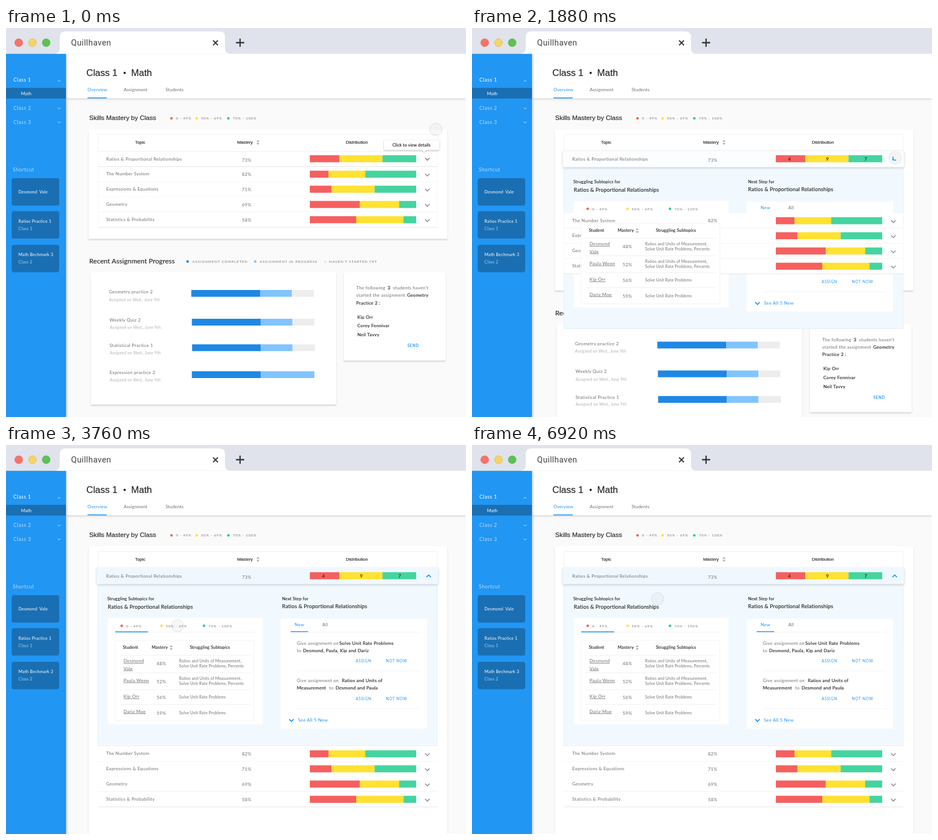
Recreate the animation shown at these times as an HTML page. Size 813 by 689 pixels, loop 6960 ms.

```html
<!DOCTYPE html>
<html lang="en">
<head>
<meta charset="utf-8">
<title>Class dashboard</title>
<style>
html, body { margin: 0; width: 100%; height: 100%; overflow: hidden; background: #fafafa; }
svg { display: block; }
text { font-family: Lato, sans-serif; white-space: pre; fill: #6e6e6e; font-size: 8px; letter-spacing: .3px; }
.dark, .sub { fill: #222; stroke: #222; stroke-width: .15px; }
.blue { fill: #2196f3; }
.sans { font-family: "Liberation Sans", Arial, sans-serif; fill: #1c1c1c; stroke: #1c1c1c; stroke-width: .12px; letter-spacing: 0; }
.nav { font-size: 9px; letter-spacing: .5px; fill: #b9dcfb; }
.mini { font-size: 7.5px; letter-spacing: .2px; }
.tab { letter-spacing: .1px; }
.note { font-size: 7px; letter-spacing: .2px; }
.pale { fill: #b0b0b0; }
.key { font-size: 6px; letter-spacing: 1px; }
.caps { letter-spacing: 1.1px; }
.act { font-size: 6.6px; letter-spacing: .75px; fill: #2196f3; }
.sub { font-size: 9.3px; letter-spacing: .2px; }
.link { text-decoration: underline; }
.white { fill: #fff; }
.lift { filter: drop-shadow(0 2px 1.2px rgba(0,0,0,.15)); }
</style>
</head>
<body>
<svg id="stage" width="813" height="689" viewBox="0 0 813 689"></svg>
<script>
const RED = '#f5605f', YELLOW = '#ffe232', GREEN = '#45d4a0';
const NAVY = '#1a6fb3', BLUE = '#2196f3', DEEP = '#1e88e5', SKY = '#82c4ff', GREY = '#ededed';
const LOOP = 6960, STEP = 40;

const esc = s => s.replace(/&/g, '&amp;');
const text = (x, y, s, cls = '', attrs = '') => `<text x="${x}" y="${y}" class="${cls}" ${attrs}>${esc(s)}</text>`;
const rect = (x, y, w, h, fill, attrs = '') => `<rect x="${x}" y="${y}" width="${w}" height="${h}" fill="${fill}" ${attrs}/>`;
const dot = (x, y, r, fill, attrs = '') => `<circle cx="${x}" cy="${y}" r="${r}" fill="${fill}" ${attrs}/>`;
const path = (d, stroke, w = 1, attrs = '') => `<path d="${d}" fill="none" stroke="${stroke}" stroke-width="${w}" ${attrs}/>`;
const line = (x1, x2, y, stroke = '#e6e6e6') => path(`M${x1} ${y}H${x2}`, stroke);
const group = (id, body, attrs = '') => `<g id="${id}" ${attrs}>${body}</g>`;
const chevron = (x, y, stroke, w = 1.6, r = 4) => path(`M${x - r} ${y - r / 2}l${r} ${r}l${r} ${-r}`, stroke, w);
const sorter = (x, y) => `<path d="M${x - 2.7} ${y - 1}l2.7 -3.6l2.7 3.6zM${x - 2.7} ${y + 1}l2.7 3.6l2.7 -3.6z" fill="#adadad"/>`;

// Stacked bar: edges are the x positions between segments
const bar = (edges, y, h, fills) =>
  fills.map((f, i) => rect(edges[i], y, edges[i + 1] - edges[i], h, f)).join('');

const legend = (y, dots, labels) => ['0 - 49%', '50% - 69%', '70% - 100%'].map((s, i) =>
  dot(dots[i], y, 2.3, [RED, YELLOW, '#2fc6a4'][i]) + text(labels[i], y + 2.4, s, 'key')).join('');

function browser() {
  const lights = [[22.5, '#fb7068', '#d9655f'], [46.8, '#f6d463', '#d3b85c'], [71, '#5cc254', '#55a84f']];
  return rect(0, 0, 813, 45.5, '#e0e3eb') +
    `<path d="M85 45.5q10 0 10 -10V16q0 -10 10 -10H377q10 0 10 10V35.5q0 10 10 10z" fill="#fff"/>` +
    lights.map(([x, f, s]) => dot(x, 26, 7, f, `stroke="${s}" stroke-width=".7"`)).join('') +
    text(115, 31, 'Quillhaven', '', 'style="font:14.5px Roboto,sans-serif;letter-spacing:.4px;fill:#444"') +
    path('M366 22l8.5 8.5m0 -8.5l-8.5 8.5', '#333', 1.9) +
    path('M406.5 26h14.5M413.7 18.8v14.5', '#333', 2.3);
}

function sidebar() {
  const card = (y, h) => rect(10, y, 84, h, NAVY, 'rx="4"');
  return rect(0, 45.5, 106, 644, BLUE, 'style="filter:drop-shadow(1px 0 2px #0004)"') +
    rect(0, 106, 106, 19, NAVY) +
    text(13, 95, 'Class 1', 'nav white') + text(26.5, 118.7, 'Math', 'white', 'style="letter-spacing:0"') +
    text(13, 145, 'Class 2', 'nav') + text(13, 169.5, 'Class 3', 'nav') + text(12, 254.2, 'Shortcut', 'nav') +
    path('M91.2 95l2.6 -2.6l2.6 2.6', '#cfe8fd') +
    chevron(94, 142.5, '#cfe8fd', 1, 2.6) + chevron(94, 167, '#cfe8fd', 1, 2.6) +
    card(266, 48.5) + card(324.5, 48.5) + card(384, 48.5) +
    text(22, 292.5, 'Desmond  Vale', 'mini white') +
    text(22, 344.7, 'Ratios Practice 1', 'mini white') + text(22, 357.5, 'Class 1', 'mini', 'style="fill:#a9d0f2"') +
    text(22, 403.5, 'Math Bechmark 3', 'mini white') + text(22, 416.7, 'Class 2', 'mini', 'style="fill:#a9d0f2"');
}

function header() {
  const big = 'style="font-size:16.5px"';
  return rect(106, 45.5, 707, 79, '#fff', 'style="filter:drop-shadow(0 1px 2px #0003)"') +
    text(142, 85, 'Class 1', 'sans', big) + dot(209.7, 79.6, 2, '#1c1c1c') + text(221.3, 85, 'Math', 'sans', big) +
    text(144, 112, 'Overview', 'tab blue') + text(208, 112, 'Assignment', 'tab') + text(282, 112, 'Students', 'tab') +
    rect(144, 123, 34, 1.6, BLUE);
}

function recent() {
  const jobs = [
    ['Geometry practice 2', 182, 470, 464, [327.5, 449, 505, 544]],
    ['Weekly Quiz 2', 183, 519.5, 515, [328.5, 450, 506, 545]],
    ['Statistical Practice 1', 183, 565, 560.3, [329, 450.5, 506.5, 546]],
    ['Expression practice 2', 183, 612.5, 608, [328.5, 450, 545, 545]]
  ];
  const small = 'key caps';
  return text(147, 417, 'Recent Assignment Progress', 'dark', 'style="font-size:12px;letter-spacing:.1px"') +
    dot(321, 413.6, 2.3, DEEP) + text(329.5, 416, 'ASSIGNMENT COMPLETED', small) +
    dot(440.5, 413.6, 2.3, SKY) + text(448.5, 416, 'ASSIGNMENT IN PROGRESS', small) +
    dot(564.5, 414, 2.3, '#e9e9e9') + text(571, 416.2, "HAVEN'T STARTED YET", small) +
    rect(149.5, 433, 434, 234, '#fff', 'class="lift"') +
    rect(597, 433, 180, 156, '#fff', 'class="lift" rx="2"') +
    jobs.map(([name, x, y, top, edges], i) => text(x, y, name) +
      text(x + .3, y + (i == 2 ? 12.5 : 13.5), 'Assigned on Wed., June 9th', 'note pale') +
      bar(edges, top, 12, [DEEP, SKY, GREY])).join('') +
    text(619, 463, 'The following') + text(674.5, 463, '3', 'dark') + text(684, 463, "students haven't") +
    text(619, 476, 'started the assignment') + text(709, 476, 'Geometry', 'dark') +
    text(619, 489.7, 'Practice 2 :', 'dark') +
    text(621, 514.5, 'Kip Orr', 'dark') + text(621, 530.3, 'Corey Fennivar', 'dark') +
    text(621, 546.3, 'Neil Tavvy', 'dark') + text(709.5, 565.3, 'SEND', 'act', 'font-weight="700"');
}

function tableHead() {
  const s = 'style="font-size:7.8px"';
  return text(147, 163, 'Skills Mastery by Class', 'sans', 'style="font-size:11.5px"') +
    legend(160, [292.5, 337, 393], [300.5, 344.7, 401]) +
    path('M162.5 352V188.5H762V352', '#f1f1f1') + line(162, 762, 218.5, '#e2e2e2') +
    text(228, 205, 'Topic', 'sans', s) + text(408.5, 205, 'Mastery', 'sans', s) +
    text(600.5, 205, 'Distribution', 'sans', s) + sorter(445.3, 202.5);
}

function panel() {
  const topic = 'Ratios & Proportional Relationships';
  return rect(162.5, 246, 599.5, 286.5, '#f2f9fe', 'stroke="#dcedf8" stroke-width=".8"') +
    text(179, 274.7, 'Struggling Subtopics for', 'mini dark') + text(180, 290.3, topic, 'sub') +
    text(488, 274.5, 'Next Step for', 'mini dark') + text(488, 289, topic, 'sub') +
    rect(180, 306.5, 273.5, 188.5, '#fff') + line(193, 438, 331.5, '#f3f3f3') +
    rect(193, 330.2, 58, 1.6, BLUE, 'id="underline"') +
    rect(485.5, 307.5, 258.5, 194.5, '#fff') +
    text(510, 321.3, 'New', 'blue') + text(559, 321.3, 'All') +
    line(503, 732, 331.5, '#f3f3f3') + rect(503, 329.8, 31, 1.5, BLUE) +
    text(514, 353.7, 'Give assignment on') + text(589, 353.7, 'Solve Unit Rate Problems', 'dark') +
    text(514, 366.7, 'to') + text(525, 366.7, 'Desmond, Paula, Kip and Dariz', 'dark') +
    text(514, 420, 'Give assignment on') + text(593.5, 420, 'Ratios and Units of', 'dark') +
    text(514, 432.8, 'Measurement', 'dark') + text(571, 432.8, 'to') + text(582.5, 432.8, 'Desmond and Paula', 'dark') +
    [385, 452].map(y => text(618, y, 'ASSIGN', 'act') + text(671.5, y, 'NOT NOW', 'act') +
      line(515, 732, y + 15, '#f2f2f2')).join('') +
    chevron(504.5, 487.7, BLUE, 1.8) + text(516, 490.4, 'See All 5 New', 'blue');
}

// A student row: name lines, score, subtopic lines
const student = ([name, score, topics], i) => {
  const y = [390, 422, 449.5, 477.5][i];
  const nameY = name[1] ? 385 : [389, 419.7, 448, 474.5][i];
  const topicY = topics[1] ? [384.7, 415.7][i] : y - (i ? .5 : -1.5);
  return name.map((s, k) => text(207.8, nameY + 13.5 * k, s, 'link')).join('') +
    text(266.3, y, score) +
    topics.map((s, k) => text(306, topicY + 9.5 * k, s, 'note')).join('');
};

function students() {
  const units = ['Ratios and Units of Measurement,', 'Solve Unit Rate Problems, Percents'];
  const solve = ['Solve Unit Rate Problems'];
  const low = [[['Desmond', 'Vale'], '48%', units], [['Paula Wenn'], '52%', units],
    [['Kip Orr'], '56%', solve], [['Dariz Moe'], '59%', solve]];
  const mid = [[['Beth'], '58%', ['Percents']],
    [['Colin'], '60%', ['Ratios and Ratio Language, Ratios and', 'Units of Measurement']],
    [['Nadia'], '61%', ['Ratios and Ratio Language']], [['Corey'], '65%', solve]];
  return legend(320.2, [204.5, 275, 350], [212.5, 282.5, 358]) +
    rect(193, 346, 245, 142.5, '#fff', 'stroke="#f3f3f3"') +
    text(206.5, 361, 'Student', 'mini dark') + text(257.5, 361, 'Mastery', 'mini dark') + sorter(292, 359) +
    text(325, 361, 'Struggling Subtopics', 'mini dark') +
    [372.5, 403.5, 433.5, 459.5].map(y => line(200, 432, y, '#f1f1f1')).join('') +
    group('low', low.map(student).join('')) + group('mid', mid.map(student).join(''));
}

const topics = [
  ['Ratios & Proportional Relationships', '73%', 218.5, 231.6, 589, 665.5],
  ['The Number System', '82%', 245.5, 259, 570, 635],
  ['Expressions & Equations', '71%', 272.3, 285.6, 575.5, 651.5],
  ['Geometry', '69%', 299, 312.6, 625.5, 695],
  ['Statistics & Probability', '58%', 326, 339.6, 619, 702.5]
];

function topicRow([name, score, top, mid, a, b], i) {
  const y = i ? mid + 2.3 : 235.2;
  return rect(162.5, top, 599.5, 27, '#fff') + line(162.5, 762, top + 27, '#e4e4e4') +
    text(177, y, name) + text(417, i ? y + .6 : 237, score) +
    bar([537, a, b, 725], mid - 6.3, 12.5, [RED, YELLOW, GREEN]) +
    (i ? chevron(744.7, mid + 1.2, '#8f8f8f') : '');
}

const firstRow = () => topicRow(topics[0], 0) +
  group('hover',
    rect(160.5, 218, 603, 28.5, '#fff', 'id="hoverBack" style="filter:drop-shadow(0 1px 2px #0003)"') +
    text(177, 235.2, topics[0][0]) + text(417, 237, '73%') +
    bar([537, 589, 665.5, 725], 225.3, 12.5, [RED, YELLOW, GREEN]) +
    [['4', 561.3], ['9', 628.3], ['7', 696]].map(([s, x]) =>
      text(x, 234.8, s, 'dark', 'text-anchor="middle"')).join('')) +
  group('toggle', chevron(0, 0, '#8f8f8f', 1.8));

const tooltip = () => group('tip',
  '<path d="M670 198.5H764q2 0 2 2V214q0 2 -2 2H742.5l-3.5 4l-3.5 -4H670q-2 0 -2 -2V200.5q0 -2 2 -2z" fill="#fff"/>' +
  text(683, 209.6, 'Click to view details', 'mini dark', 'style="letter-spacing:.1px"'),
  'style="filter:drop-shadow(0 1px 1.5px #0004)"');

document.getElementById('stage').innerHTML =
  rect(0, 0, 813, 689, '#fafafa') +
  group('recent', recent()) +
  rect(146, 180, 634, 193, '#fff', 'id="card" class="lift"') +
  tableHead() +
  group('panel', panel()) +
  group('rows', topics.slice(1).map((t, i) => topicRow(t, i + 1)).join('')) +
  group('students', students()) +
  firstRow() + tooltip() +
  header() + sidebar() + browser() +
  dot(0, 0, 11, 'rgba(150,150,150,.08)', 'id="cursor" stroke="rgba(130,130,130,.22)" stroke-width=".8"');

const el = id => document.getElementById(id);
const [recentG, card, panelG, rowsG, studentsG, hover, hoverBack, toggle, tip, low, mid, underline, cursor] =
  ['recent', 'card', 'panel', 'rows', 'students', 'hover', 'hoverBack', 'toggle', 'tip', 'low', 'mid', 'underline', 'cursor'].map(el);
const toggleLine = toggle.firstChild;

const span = (t, a, b) => Math.min(1, Math.max(0, (t - a) / (b - a)));
const inOut = n => x => x < .5 ? (2 * x) ** n / 2 : 1 - (2 - 2 * x) ** n / 2;
const cubic = inOut(3), quart = inOut(4), quadIn = x => x * x;
const mix = (a, b, p) => a + (b - a) * p;
const rgb = (a, b, p) => `rgb(${a.map((v, i) => Math.round(mix(v, b[i], p)))})`;
const shift = (node, x, y) => node.setAttribute('transform', `translate(${x} ${y})`);
const fade = (node, v) => node.setAttribute('opacity', v);

// start, end, target x, target y, easing
const moves = [
  [0, 760, 748, 230, cubic],
  [3120, 3760, 303, 320, cubic],
  [4520, 5720, 226, 320.5, cubic],
  [6840, 6920, 328, 272.5, quadIn]
];

function draw(t) {
  let x = 759.5, y = 179.5;
  for (const [a, b, tx, ty, ease] of moves) {
    const p = ease(span(t, a, b));
    x = mix(x, tx, p);
    y = mix(y, ty, p);
  }
  shift(cursor, x, y);

  const over = cubic(span(t, 600, 1120));
  fade(hover, over);
  fade(tip, 1 - span(t, 560, 840));

  const open = quart(span(t, 1673, 2149));
  const shown = span(t, 1650, 1770);
  shift(rowsG, 0, 288 * open);
  shift(recentG, 0, 320 * open);
  card.setAttribute('height', 193.5 + 320 * open);
  fade(panelG, shown);
  fade(studentsG, shown);
  hoverBack.setAttribute('fill', rgb([255, 255, 255], [240, 248, 255], open));
  toggle.setAttribute('transform', `translate(${mix(744.7, 747, open)} 232.2) rotate(${180 * open})`);
  toggleLine.setAttribute('stroke', rgb([143, 143, 143], [33, 150, 243], over));

  const tab = cubic(span(t, 4440, 4800)) - cubic(span(t, 6040, 6480));
  shift(underline, 77.5 * tab, 0);
  fade(low, 1 - tab);
  fade(mid, tab);
}

const start = performance.now();
function tick() {
  const t = (performance.now() - start) % LOOP;
  draw(Math.floor(t / STEP) * STEP);
  requestAnimationFrame(tick);
}
tick();
</script>
</body>
</html>
```
